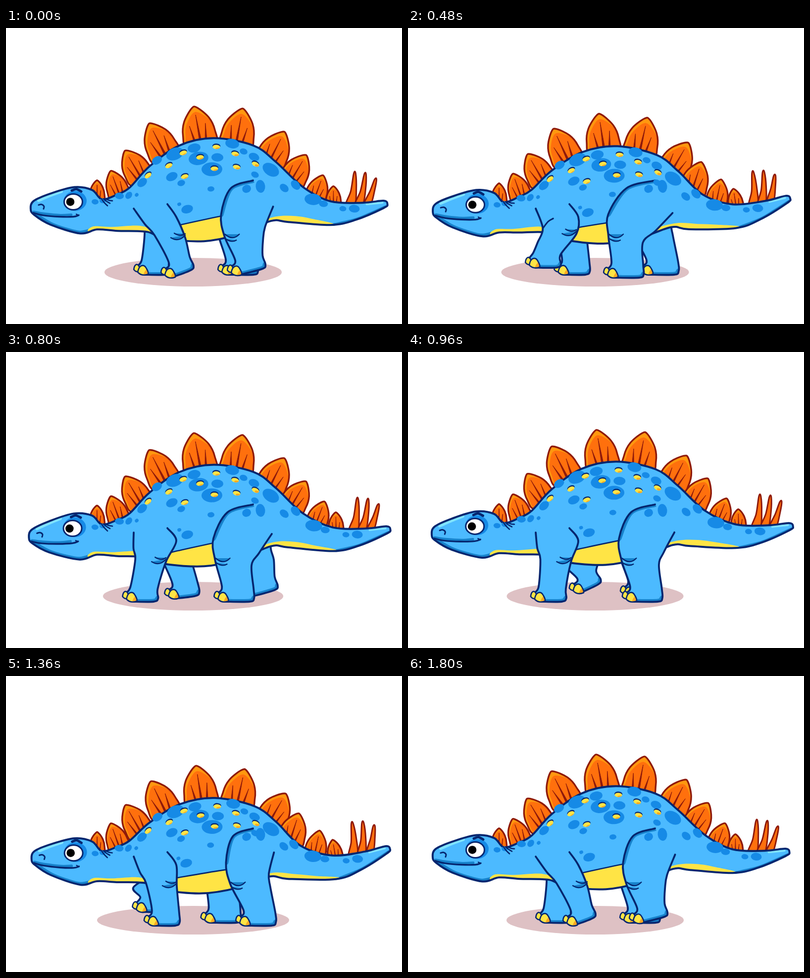
Write an HTML page with a canvas that moves like this. It is 800 by 600 pixels and loops after 1.84 s.

```html
<!DOCTYPE html>
<html lang="en">
<head>
<meta charset="utf-8">
<title>Walking stegosaurus</title>
<style>
html, body { margin: 0; width: 100%; height: 100%; overflow: hidden; background: #fff; }
canvas { display: block; }
</style>
</head>
<body>
<canvas id="stage" width="800" height="600"></canvas>
<script>
const c = document.getElementById('stage').getContext('2d');
c.lineCap = c.lineJoin = 'round';

const BLUE = '#4cbaff', SHADE = '#1782cb', SPOT = '#168ae6', NAVY = '#05266f', SHINE = '#80e4ff',
  YELLOW = '#ffe445', GOLD = '#f9a823', ORANGE = '#ff700d', LIGHT = '#ff980f', MAROON = '#8f1a0a';
const STEP = 40, LOOP = 1840, CYCLE = 1800;

const mix = (a, b, u) => a + (b - a) * u;
const ramp = (a, b, v) => Math.min(1, Math.max(0, (v - a) / (b - a)));
const smooth = u => u * u * (3 - 2 * u);
const wrap = t => (t % CYCLE + CYCLE) % CYCLE;
const pairs = list => Array.from({ length: list.length / 2 }, (_, i) => [list[2 * i], list[2 * i + 1]]);

// Two steps per cycle: most of the body swings at double rate
let pose;
function poseAt(t) {
  const wave = (rate, peak) => Math.cos(rate * 2 * Math.PI * (t - peak) / CYCLE);
  const side = wave(1, 450);
  return {
    lift: 12 * (1 - wave(2, 80)) - 4 * side - 1.5,
    lean: 2.6 * (1 - wave(2, 0)) + 2 * wave(2, 225) + side,
    head: 4.3 * (1 - wave(2, 100)) - side - .7,
    nod: .5 + 4 * wave(2, 780) + 3 * wave(1, 800),
    tail: 10 * wave(2, 750) + 3 * wave(1, 1360) - 5,
    slide: 4 * (1 - wave(1, 150))
  };
}

// Moves a resting point: the torso tilts and squashes, head nods, tail swings
function bend([x, y]) {
  const { lift, lean, head, nod, tail, slide } = pose;
  const torso = ramp(190, 280, x) * ramp(610, 562, x);
  const tx = lean * (300 - y) / 140;
  const ty = lift * mix(1, .4, ramp(230, 432, y)) + lean * (x - 450) / 140;
  let ex, ey;
  if (x < 400) {
    const reach = ramp(190, 55, x);
    ex = -.5 * nod * reach;
    ey = head + nod * reach;
  } else {
    const slope = (tail - lift) / 190;
    ex = slide * ramp(600, 670, x) + slope * (358 - y);
    ey = lift + slope * (x - 580);
  }
  return [x + mix(ex, tx, torso), y + mix(ey, ty, torso)];
}
const bent = list => pairs(list).map(bend);

// Catmull-Rom curve through points; a doubled point makes a corner
function spline(pts, closed) {
  const n = pts.length, p = new Path2D();
  const at = i => closed ? pts[(i + n) % n] : pts[Math.min(n - 1, Math.max(0, i))];
  p.moveTo(...pts[0]);
  for (let i = 0; i < (closed ? n : n - 1); i++) {
    const [a, b, d, e] = [at(i - 1), at(i), at(i + 1), at(i + 2)];
    if (b[0] === d[0] && b[1] === d[1]) continue;
    p.bezierCurveTo(b[0] + (d[0] - a[0]) / 6, b[1] + (d[1] - a[1]) / 6,
      d[0] - (e[0] - b[0]) / 6, d[1] - (e[1] - b[1]) / 6, d[0], d[1]);
  }
  if (closed) p.closePath();
  return p;
}
function fill(path, color) { c.fillStyle = color; c.fill(path); }
function stroke(path, color, width) { c.strokeStyle = color; c.lineWidth = width; c.stroke(path); }
function inside(path, draw) { c.save(); c.clip(path); draw(); c.restore(); }
function oval(x, y, rx, ry, turn, color) {
  const p = new Path2D();
  p.ellipse(x, y, rx, ry, turn, 0, 7);
  fill(p, color);
  return p;
}
const line = (list, color, width) => stroke(spline(bent(list)), color, width);

const PLATE_TIPS = [184,309, 212,290, 241,249, 290,194, 380,160, 478,164, 562,211, 606,258, 640,299, 661,321];

// Plates grow towards the middle of the row and fan out from it
function plate(tip, i) {
  const half = 15 + 18 * Math.sin(Math.PI * i / 9), long = half * 1.6 + 10;
  const tilt = .54 * Math.sin(2 * Math.PI * i / 9);
  const [x, y] = bend(tip);
  const [bx, by] = bend([tip[0] + long * Math.sin(tilt), tip[1] + long * Math.cos(tilt)]);
  const ax = x - bx, ay = y - by, len = Math.hypot(ax, ay);
  const place = ([u, v]) => [bx + v * ax - u * half * ay / len, by + v * ay + u * half * ax / len];
  const leaf = spline(pairs([-.86,-.3, -1,.15, -.78,.58, -.17,.97, .17,.97, .78,.58, 1,.15, .86,-.3]).map(place), true);
  const core = spline(pairs([-.75,-.3, -.84,.15, -.62,.52, 0,.84, .74,.54, 1,.15, .86,-.3]).map(place), true);
  fill(leaf, LIGHT);
  inside(leaf, () => fill(core, ORANGE));
  for (const s of [-1, 0, 1]) {
    const vein = new Path2D();
    vein.moveTo(...place([s * .3 - .08, -.3]));
    vein.lineTo(...place([s * .5, s ? .42 : .74]));
    vein.lineTo(...place([s * .3 + .08, -.3]));
    fill(vein, MAROON);
    stroke(vein, MAROON, 1);
  }
  stroke(leaf, MAROON, 3.4);
}

function spike(i) {
  const tx = 704 + 21 * i, ty = 295 + 4 * i * i - 2 * i, bx = 695 + 17 * i, half = 9 - i;
  const p = spline(bent([bx - half, 358, mix(bx, tx, .5) - half * .4, 331, tx - 2, ty, tx + 2, ty,
    mix(bx, tx, .6) + half * .75, 328, bx + half, 358]), true);
  fill(p, ORANGE);
  stroke(p, MAROON, 3);
}

function claw(x, y, w, h) {
  const p = new Path2D();
  p.moveTo(x, y - h * .3);
  p.bezierCurveTo(x + w * .1, y - h * 1.05, x + w * .6, y - h * 1.2, x + w * .85, y - h * .65);
  p.quadraticCurveTo(x + w * 1.05, y - h * .3, x + w, y - 2);
  p.quadraticCurveTo(x + w * .4, y + 3, x, y - h * .3);
  fill(p, YELLOW);
  inside(p, () => oval(x + w, y, w * .45, h * .7, .3, GOLD));
  stroke(p, NAVY, 2.6);
}

// Joints follow the foot: d is its distance from rest, h its height
const FRONT = {
  start: 0, swing: 640, from: 222, to: 312, rest: 256, height: 26, tilt: .48, width: 73,
  fore: (d, h, far) => [[258, 366], [264 + .3 * d + .7 * h, 398 + .4 * h],
    [272 + .5 * d - far * h, 420 + .7 * h]],
  back: (d, h) => [[334 + .5 * d + .8 * h, 425 - .4 * h], [344, 383], [326, 357]]
};
const HIND = {
  start: 1600, swing: 500, from: 380, to: 482, rest: 390, height: 5, tilt: .28, width: 82,
  fore: d => [[499, 309], [440 + .25 * d, 325], [402 + .58 * d, 378], [402 + .7 * d, 422]],
  back: d => [[471 + .86 * d, 435 - .1 * d], [498 + .45 * d, 412 - .15 * d], [534 + .1 * d, 376 - .25 * d]]
};

// The foot is drawn back evenly on the ground, then swings forward with the heel up
function step(kind, t) {
  const p = wrap(t - kind.start), u = p / kind.swing, swinging = u < 1;
  const heel = wrap(p + 150) / 550;
  return {
    x: swinging ? mix(kind.to, kind.from, smooth(u)) : mix(kind.from, kind.to, (p - kind.swing) / (CYCLE - kind.swing)),
    h: swinging ? kind.height * Math.sin(Math.PI * u) ** .7 : 0,
    tilt: heel < 1 ? -kind.tilt * Math.sin(Math.PI * heel) : 0
  };
}

function wrinkle(x, y, w, sag, end) {
  const p = new Path2D();
  p.moveTo(x, y);
  p.quadraticCurveTo(x + w * .55, y + sag, x + w, y + end);
  fill(p, SHADE);
  stroke(p, NAVY, 2.4);
}

function leg(kind, t, far) {
  const { x, h, tilt } = step(kind, t + far * CYCLE / 2);
  const y = 507 - h, d = x - kind.rest, w = kind.width;
  const cos = Math.cos(tilt), sin = Math.sin(tilt);
  const turn = (px, py) => [x + 22 + (px - 22) * cos - py * sin, y + (px - 22) * sin + py * cos];
  const fore = kind.fore(d, h, far), back = kind.back(d, h);
  const toe = [x + 22, y - 1];
  const sole = [toe, toe, turn(w - 9, -1), turn(w, -8)];
  const shape = spline([...fore, [x + 17, y - 31], [x + 8, y - 16], ...sole, turn(w - 1, -27), ...back]);

  c.save();
  if (far) c.translate(kind === FRONT ? 15 : 0, -6);
  fill(shape, BLUE);
  inside(shape, () => {
    stroke(spline(sole), SHADE, 11);
    if (kind === HIND) stroke(spline(fore.slice(0, 3)), SHADE, 10);
  });
  if (!far && kind === HIND) {
    const [kx, ky] = fore[3];
    wrinkle(kx + 1, ky - 4, 29, 14, 0);
    wrinkle(kx + 2, ky + 5, 22, 9, 3);
  } else if (!far) {
    const [kx, ky] = back[0];
    wrinkle(kx - 29, ky, 29, 10, -5);
    wrinkle(kx - 22, ky - 9, 22, 8, 1);
    if (h > 8) {
      const [ex, ey] = fore[1];
      stroke(spline([[ex, ey], [ex + 11, ey - 14], [ex + 21, ey - 20]]), NAVY, 3);
    }
  }
  stroke(shape, NAVY, 3.8);
  claw(x + 1, y - 7, 13, 15);
  claw(x + 9, y, 21, 20);
  c.restore();
}

const OUTLINE = [50,366, 56,350, 90,335, 138,322, 174,328, 194,347, 225,337, 250,323, 290,280, 350,238,
  420,223, 500,238, 545,271, 600,322, 655,351, 720,354, 762,350, 770,357, 762,365, 705,389, 655,399,
  570,393, 535,391, 470,418, 400,432, 320,427, 285,413, 225,411, 184,408, 150,416, 90,398, 57,378];
const CHEST = [176,402, 215,403, 272,401, 300,415, 176,415];
const BELLY = [300,411, 360,397, 440,380, 490,372, 490,440, 300,440];
const RUMP = [500,396, 545,382, 585,381, 620,387, 662,398, 600,404, 500,404];

function body() {
  const shape = spline(bent(OUTLINE), true);
  fill(shape, BLUE);
  inside(shape, () => {
    line([57,378, 90,398, 120,409, 150,416, 180,409], SHADE, 11);
    line([766,363, 735,377, 705,389, 662,399], SHADE, 7);
    for (const part of [CHEST, BELLY, RUMP]) fill(spline(bent(part), true), YELLOW);
    line(BELLY.slice(0, 8), NAVY, 2.6);
    line([66,349, 90,339, 112,331], SHINE, 6);
    line([728,357, 760,354], SHINE, 4);
  });
  stroke(shape, NAVY, 4);
}

// x, y, radius
const PATCHES = [[180,352,7], [195,350,6], [229,340,9], [248,339,8], [264,338,4], [275,313,11], [305,268,11],
  [335,301,12], [354,314,8], [341,255,18], [380,243,13], [389,264,20], [427,262,12], [416,286,21],
  [457,234,14], [480,250,8], [414,326,7], [501,261,11], [535,287,18], [503,297,8], [562,324,10],
  [585,318,11], [620,347,17], [641,356,9], [680,366,7], [703,366,11], [366,367,12], [350,357,4]];
const BUMPS = [287,298, 329,278, 358,252, 392,261, 361,300, 421,284, 425,240, 463,254, 466,281, 504,275];
const slant = x => x > 230 && x < 600 ? (x - 420) / 200 : .1;

function markings() {
  for (const [x, y, r] of PATCHES) oval(...bend([x, y]), r, r * .62 + 1, slant(x), SPOT);
  oval(486, 326, 9, 8, -.4, SPOT);
  oval(514, 321, 9.5, 13, -.1, SPOT);
  for (const [x, y] of pairs(BUMPS)) {
    const [px, py] = bend([x, y]);
    oval(px, py - 1.2, 8, 4.8, slant(x), NAVY);
    const p = oval(px, py + .8, 7.6, 4.4, slant(x), YELLOW);
    inside(p, () => oval(px + 4, py + 4.5, 6, 2.6, slant(x), GOLD));
  }
}

function head() {
  line([56,372, 78,376, 110,379, 132,378], SHADE, 5);
  line([55,374, 75,379, 108,382, 136,382, 147,379], NAVY, 3.4);
  line([142,377, 146,379], NAVY, 2.4);
  line([66,358, 72,357, 77,361, 76,366], NAVY, 3);
  oval(...bend([140, 350]), 23, 20, 0, SPOT);
  stroke(oval(...bend([136, 352]), 18.5, 16, 0, '#fff'), NAVY, 3);
  oval(...bend([130, 352]), 8.3, 8.3, 0, '#000');
  line([133,329, 142,326, 152,331], NAVY, 5);
  for (let i = 0; i < 3; i++)
    line([193 + 4 * i, 346, 198 + 5 * i, 353 - 2 * i, 205 + 5 * i, 360 - 5 * i], NAVY, 2.6);
}

function draw(t) {
  pose = poseAt(t);
  c.fillStyle = '#fff';
  c.fillRect(0, 0, 800, 600);
  oval(378, 495, 179 + .6 * pose.lift, 29, 0, '#dec1c4');
  leg(HIND, t, 1);
  leg(FRONT, t, 1);
  pairs(PLATE_TIPS).forEach(plate);
  [0, 1, 2].forEach(spike);
  body();
  leg(FRONT, t, 0);
  leg(HIND, t, 0);
  markings();
  head();
}

const start = performance.now();
function tick() {
  const t = Math.floor((performance.now() - start) % LOOP / STEP) * STEP;
  draw(t % CYCLE);
  requestAnimationFrame(tick);
}
tick();
</script>
</body>
</html>
```
